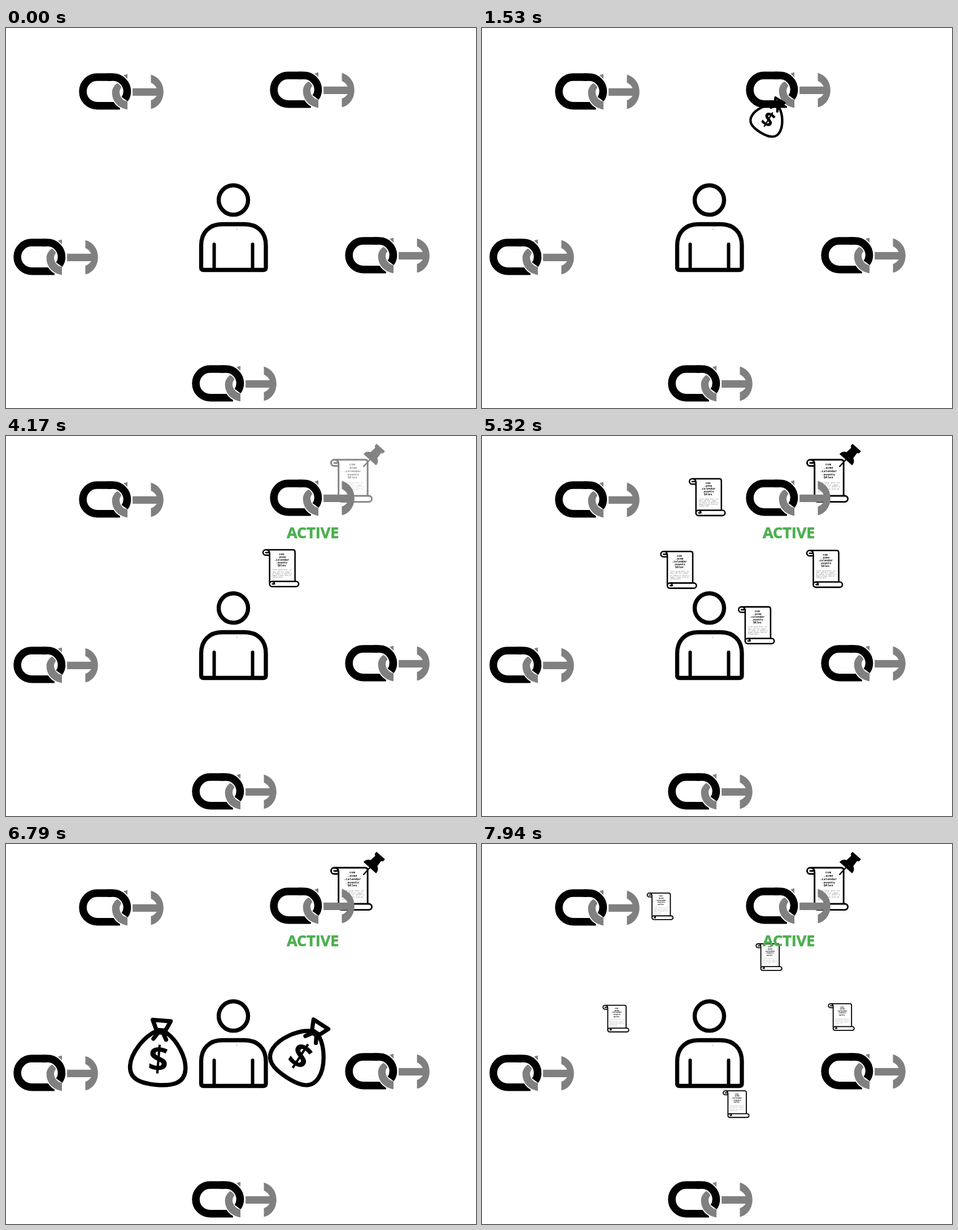
Animation of 832x673 px, one loop 8 s. Source, as an HTML page without scripts:

```html
<!DOCTYPE html>
<html lang="en">
<head>
<meta charset="utf-8">
<title>Linked messages</title>
<style>
html, body { margin: 0; width: 100%; height: 100%; overflow: hidden; background: #fff; }
svg { display: block; width: 832px; height: 673px; }
.line { fill: none; stroke: #000; stroke-linecap: round; stroke-linejoin: round; }
.gray { fill: #808080; }
.mono { font: bold 5.4px "Liberation Mono", monospace; text-anchor: middle; }
.fine { font: 3px "Liberation Mono", monospace; fill: #777; }
.cash { font: 700 47px "Open Sans", sans-serif; text-anchor: middle; }
.state { font: bold 27px "Open Sans", sans-serif; text-anchor: middle; stroke-width: .7px; }

/* Each flyer goes from (x, y) by (dx, dy), growing to size p halfway and shrinking again */
.fly { scale: 0; animation: 8s linear infinite; }
.up { --x: 407px; --y: 356px; --dx: 139px; --dy: -217px; --p: 1.04; }
.cast { --x: 550px; --y: 104px; --p: 1.03; }
.bag1 { --x: 407px; --y: 358px; --dx: 135px; --dy: -264px; --p: 1.55; rotate: 31deg; animation-name: bag1; }
.hand { --x: 408px; --y: 356px; --dx: 137px; --dy: -260px; --p: 1.25; animation-name: hand; }
.bagL { --x: 406px; --y: 358px; --dx: -321px; --dy: 43px; --p: 1.57; animation-name: bags, turn; }
.bagR { --x: 406px; --y: 359px; --dx: 278px; --dy: 30px; --p: 1.54; rotate: 33deg; animation-name: bags; }
.s1 { animation-name: scroll1; }
.s2 { animation-name: scroll2; }
.s3 { animation-name: scroll3; }
.c1 { animation-name: cast1; }
.c2 { animation-name: cast2; }
.toTL { --dx: -346px; --dy: 9px; }
.toL { --dx: -461px; --dy: 301px; }
.toR { --dx: 125px; --dy: 297px; }
.toB { --dx: -148.5px; --dy: 523.5px; }
.again { --dx: 147px; --dy: -229px; --p: 1.03; }

@keyframes bag1 {
  0%, 3.75% { translate: var(--x) var(--y); scale: 0; }
  14% { scale: var(--p); }
  24.25%, 100% { translate: calc(var(--x) + var(--dx)) calc(var(--y) + var(--dy)); scale: 0; }
}
@keyframes hand {
  0%, 18.75% { translate: var(--x) var(--y); scale: 0; }
  29.5% { scale: var(--p); }
  40.25%, 100% { translate: calc(var(--x) + var(--dx)) calc(var(--y) + var(--dy)); scale: 0; }
}
@keyframes scroll1 {
  0%, 45.1% { translate: var(--x) var(--y); scale: 0; }
  51.35% { scale: var(--p); }
  57.6%, 100% { translate: calc(var(--x) + var(--dx)) calc(var(--y) + var(--dy)); scale: 0; }
}
@keyframes cast1 {
  0%, 61% { translate: var(--x) var(--y); scale: 0; }
  67.25% { scale: var(--p); }
  73.5%, 100% { translate: calc(var(--x) + var(--dx)) calc(var(--y) + var(--dy)); scale: 0; }
}
@keyframes scroll2 {
  0%, 67.4% { translate: var(--x) var(--y); scale: 0; }
  73.65% { scale: var(--p); }
  79.9%, 100% { translate: calc(var(--x) + var(--dx)) calc(var(--y) + var(--dy)); scale: 0; }
}
@keyframes bags {
  0%, 75.8% { translate: var(--x) var(--y); scale: 0; }
  86.55% { scale: var(--p); }
  97.3%, 100% { translate: calc(var(--x) + var(--dx)) calc(var(--y) + var(--dy)); scale: 0; }
}
@keyframes turn {
  0%, 75.8% { rotate: 31deg; }
  97.3%, 100% { rotate: -31deg; }
}
@keyframes scroll3 {
  0%, 84.8% { translate: var(--x) var(--y); scale: 0; }
  91.05% { scale: var(--p); }
  97.3%, 100% { translate: calc(var(--x) + var(--dx)) calc(var(--y) + var(--dy)); scale: 0; }
}
/* Cut off by the loop at 74% of the way */
@keyframes cast2 {
  0%, 90.75% { translate: var(--x) var(--y); scale: 0; }
  97% { scale: var(--p); }
  100% { translate: calc(var(--x) + .74 * var(--dx)) calc(var(--y) + .74 * var(--dy)); scale: calc(.52 * var(--p)); }
}

.passive { fill: #808080; stroke: #808080; animation: passive 8s linear infinite; }
.active { fill: #4caf50; stroke: #4caf50; animation: active 8s linear infinite; }
.pinned { animation: pinned 8s linear infinite; }
@keyframes passive { 0%, 25% { opacity: 0; } 33.75%, 41% { opacity: 1; } 44%, 100% { opacity: 0; } }
@keyframes active { 0%, 41% { opacity: 0; } 44%, 100% { opacity: 1; } }
@keyframes pinned { 0%, 48.5% { opacity: 0; } 56%, 100% { opacity: 1; } }
</style>
</head>
<body>
<svg viewBox="0 0 832 673">
  <defs>
    <g id="chain" transform="translate(-1 -.5) scale(1.012)">
      <path class="gray" d="M126 2C140 6 148 18 148 32S140 59 126 62V47Q133 44 136 39H94V26H136Q133 19 126 16ZM78 3 85 1V10Z"/>
      <path d="M72 56.5H32A25 25 0 0 1 32 6.5H59" fill="none" stroke="#000" stroke-width="13.4"/>
      <path d="M76 13C65 16 58 24 58 33C58 48 68 60 85 63V49C76 47 72 41 71 33Q71 26 79 21Z" class="gray" stroke="#fff" stroke-width="4" paint-order="stroke"/>
      <g fill="none">
        <path d="M57 6.5H59.5A25 25 0 0 1 84.5 31.5Q84.5 39 80 45" stroke="#fff" stroke-width="17"/>
        <path d="M50 6.5H59.5A25 25 0 0 1 84.5 31.5Q84.5 39 80 45" stroke="#000" stroke-width="13.4"/>
      </g>
    </g>

    <g id="bag">
      <path class="line" stroke-width="5.6" d="M-8-32C-22-24-37-2-37 15C-37 33-22 38 0 38S37 33 37 15C37-2 22-24 8-32ZM-12-48H12L6-35H-6ZM-3-32-9-23M3-32 8-23"/>
      <text class="cash" y="20">$</text>
    </g>

    <g id="scroll">
      <path class="line" stroke-width="2.8" d="M-28-35.5H25Q29-35.5 29-31V26M-21-25H-28A5.2 5.2 0 0 1-28-35.5Q-20.5-35.5-20.5-28V31M-28-30H-22M-15.5 26H31A5 5 0 0 1 31 36.2H-15.5A5 5 0 0 1-15.5 26Q-11 27-11 31H-15"/>
      <g class="mono">
        <text x="3" y="-25.5">com</text>
        <text x="3" y="-20">.acme</text>
        <text x="3" y="-14.5">.calendar</text>
        <text x="3" y="-9">.events</text>
        <text x="3" y="-3.5">SAles</text>
      </g>
      <g class="fine">
        <text x="-15" y="5">lorem ipsum dolor sit</text>
        <text x="-15" y="8.5">amet sed elit tempor</text>
        <text x="-15" y="12">ut labore et dolore m</text>
        <text x="-15" y="15.5">magna aliqua enim ad</text>
        <text x="-15" y="19">veniam quis</text>
      </g>
    </g>

    <g id="pin">
      <path d="M-10-23H10V-18L7-16L8-5Q15-2 15 6H-15Q-15-2-8-5L-7-16L-10-18Z"/>
      <path class="line" stroke-width="2.4" d="M0 5V22"/>
    </g>

    <g id="finger" transform="translate(-490 -200)">
      <path class="line" stroke-width="3.6" d="M457 190 484 138Q491 124 502 128Q512 133 506 142L484 184M484 184 493 170Q499 165 505 170Q509 174 507 181L502 195M508 184Q514 178 522 182Q528 186 526 194L521 206M526 197Q533 191 541 196Q548 201 545 210L520 254Q513 266 500 261L443 230 433 197Q432 186 441 182L462 176"/>
    </g>
  </defs>

  <g class="pinned">
    <use href="#scroll" transform="translate(610 79) scale(1.04)"/>
    <use href="#pin" transform="translate(648 37.5) rotate(42)"/>
  </g>

  <use href="#finger" class="fly hand"/>

  <use href="#chain" x="130" y="81"/>
  <use href="#chain" x="468" y="78"/>
  <use href="#chain" x="14" y="374"/>
  <use href="#chain" x="601" y="371"/>
  <use href="#chain" x="330" y="598"/>

  <g class="line" stroke-width="7.3">
    <circle cx="402.5" cy="304.7" r="26"/>
    <path d="M345.5 385C345.5 362 360 347.5 383 347.5H422C446 347.5 460 362 460 385V424Q460 428.5 455 428.5H350Q345.5 428.5 345.5 424Z"/>
    <path stroke-width="6" d="M368.5 383V428M436.5 383V428"/>
  </g>
  <circle cx="408.5" cy="356.5" r=".7" fill="#777"/>

  <use href="#bag" class="fly bag1"/>
  <use href="#bag" class="fly bagL"/>
  <use href="#bag" class="fly bagR"/>

  <use href="#scroll" class="fly up s1"/>
  <use href="#scroll" class="fly up s2"/>
  <use href="#scroll" class="fly up s3"/>
  <use href="#scroll" class="fly up again c2"/>

  <use href="#scroll" class="fly cast toTL c1"/>
  <use href="#scroll" class="fly cast toL c1"/>
  <use href="#scroll" class="fly cast toR c1"/>
  <use href="#scroll" class="fly cast toB c1"/>
  <use href="#scroll" class="fly cast toTL c2"/>
  <use href="#scroll" class="fly cast toL c2"/>
  <use href="#scroll" class="fly cast toR c2"/>
  <use href="#scroll" class="fly cast toB c2"/>

  <text class="state passive" x="540" y="180.5">PASSIVE</text>
  <text class="state active" x="543.2" y="180.5">ACTIVE</text>
</svg>
</body>
</html>
```
